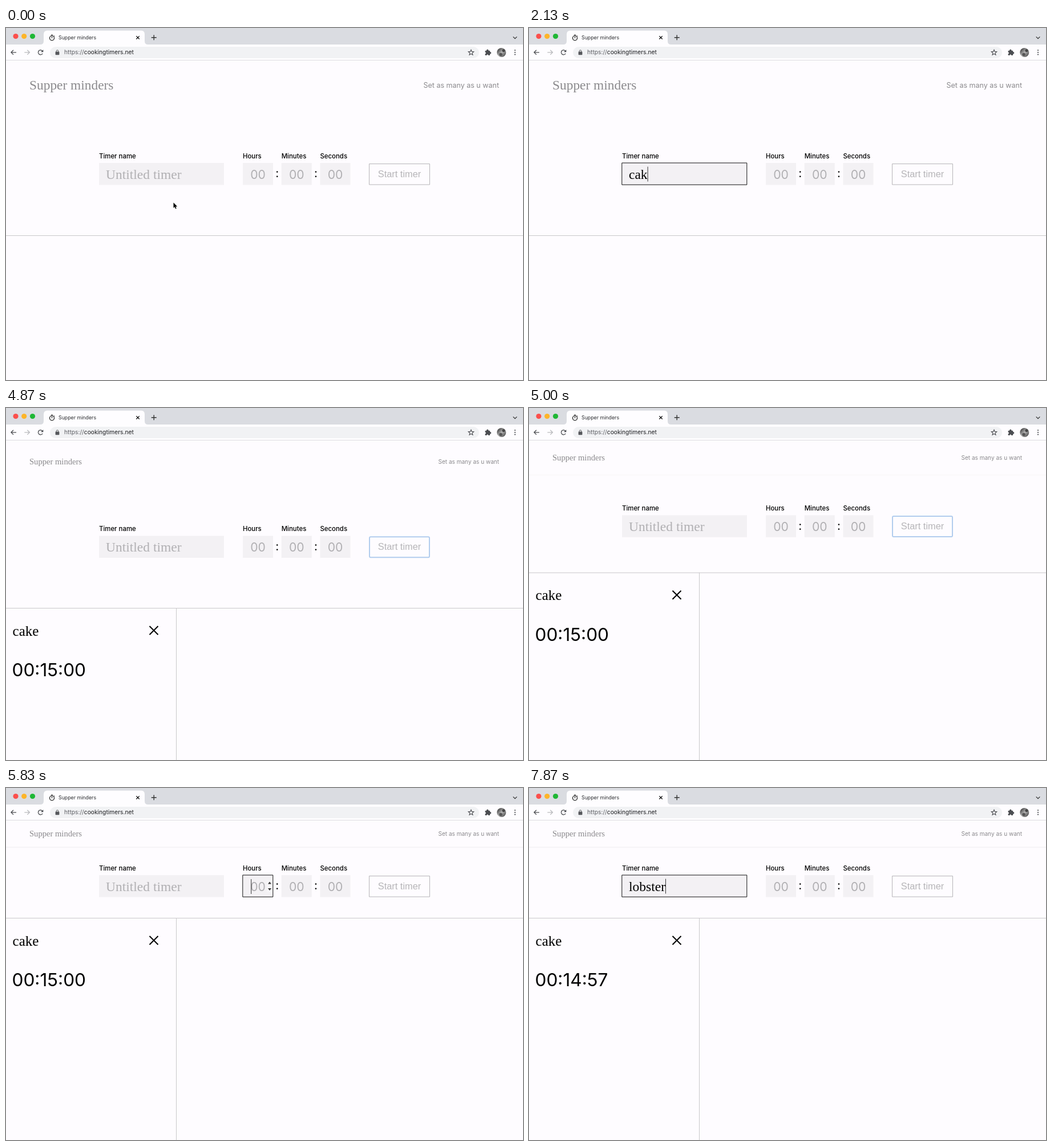
Write an HTML page with a canvas that moves like this. It is 906 by 618 pixels and loops after 8000 ms.

```html
<!DOCTYPE html>
<html lang="en">
<head>
<meta charset="utf-8">
<title>Supper minders</title>
<style>
html, body { margin: 0; width: 100%; height: 100%; overflow: hidden; background: #fefcff; }
canvas { display: block; width: 906px; height: 618px; }
</style>
</head>
<body>
<canvas id="stage" width="906" height="618"></canvas>
<script>
const ctx = document.getElementById('stage').getContext('2d');
const W = 906, H = 618, LOOP = 8000;
const SANS = 'Inter, sans-serif';
const SERIF = '"Liberation Serif", serif';
const ARIAL = '"Liberation Sans", sans-serif';
const NAME = 'Supper minders';
const PALE = '#b1b0b3', GREY = '#8b8a8d', INK = '#000', RULE = '#c9c8ca', FIELD = '#f3f1f4';
const SUBMIT = 4870, SHRINK = 260;

const clamp = v => Math.max(0, Math.min(1, v));
const lerp = (a, b, k) => a + (b - a) * k;
const ease = k => k * k * (3 - 2 * k);

function text(str, x, y, size, family, color, align = 'left', weight = 400) {
  ctx.font = `${weight} ${size}px ${family}`;
  ctx.textAlign = align;
  ctx.fillStyle = color;
  ctx.fillText(str, x, y);
}
function rect(x, y, w, h, color) {
  ctx.fillStyle = color;
  ctx.fillRect(x, y, w, h);
}
function frame(x, y, w, h, color, width = 1, r = 0) {
  ctx.beginPath();
  ctx.roundRect(x, y, w, h, r);
  ctx.strokeStyle = color;
  ctx.lineWidth = width;
  ctx.stroke();
}
function pill(x, y, w, h, r, color) {
  ctx.beginPath();
  ctx.roundRect(x, y, w, h, r);
  ctx.fillStyle = color;
  ctx.fill();
}
function disc(x, y, r, color) {
  ctx.beginPath();
  ctx.arc(x, y, r, 0, Math.PI * 2);
  ctx.fillStyle = color;
  ctx.fill();
}
function path(d, color, width) {
  const p = new Path2D(d);
  if (width) {
    ctx.strokeStyle = color;
    ctx.lineWidth = width;
    ctx.stroke(p);
  } else {
    ctx.fillStyle = color;
    ctx.fill(p);
  }
}
function cross(x, y, r, width) {
  path(`M${x - r} ${y - r}L${x + r} ${y + r}M${x + r} ${y - r}L${x - r} ${y + r}`, INK, width);
}

// Browser window
function drawTabs() {
  rect(0, 0, W, 29, '#dadce1');
  disc(17, 14.5, 4.6, '#fb4f4c');
  disc(31.7, 14.5, 4.6, '#fdb52a');
  disc(46.5, 14.5, 4.6, '#1fb735');
  path('M60 29Q66 29 66 23V11Q66 4.500 72.500 4.500H237Q243 4.500 243 11V23Q243 29 249 29Z', '#fefdff');
  ctx.beginPath();
  ctx.arc(80.5, 17.7, 4, 0, Math.PI * 2);
  ctx.strokeStyle = '#222';
  ctx.lineWidth = 1.3;
  ctx.stroke();
  path('M79 12H82M80.500 15.300V18M84 13.700L85 14.700', '#222', 1.2);
  text(NAME, 92, 20, 8.8, SANS, '#2c2d30');
  cross(231, 16.8, 2.7, 1.2);
  path('M254.700 16.800H263.700M259.200 12.300V21.300', '#333', 1.4);
  path('M888.700 15.400L892 18.600L895.300 15.400', '#333', 1.3);
}
function drawToolbar() {
  rect(0, 29, W, 27, '#fefdff');
  rect(0, 56, W, 1, '#dddce0');
  path('M18 42.800H9M13 38.700L8.900 42.800L13 46.900', '#4b4d51', 1.3);
  path('M32.300 42.800H41.300M37.300 38.700L41.400 42.800L37.300 46.900', '#b9babd', 1.3);
  ctx.beginPath();
  ctx.arc(60.5, 42.8, 4, 0.5, Math.PI * 1.75);
  ctx.strokeStyle = '#4b4d51';
  ctx.lineWidth = 1.4;
  ctx.stroke();
  path('M65.300 38V42.200H61.100Z', '#4b4d51');
  pill(77, 33, 752, 20, 10, '#f1f2f4');
  pill(86.6, 41.6, 6.8, 5.6, 0.8, '#55575b');
  path('M88.200 42V40.600A1.800 1.800 0 0 1 91.800 40.600V42', '#55575b', 1);
  text('https://', 102, 46.3, 10.25, SANS, '#5c5e63');
  const x = 102 + ctx.measureText('https://').width;
  text('cookingtimers.net', x, 46.3, 10.25, SANS, '#1c1d20');
  drawStar(815, 43.2);
  drawPuzzle();
  drawAvatar();
  for (const y of [39, 42.8, 46.6]) disc(892, y, 1.1, '#4b4d51');
}
function drawStar(x, y) {
  ctx.beginPath();
  for (let i = 0; i < 10; i++) {
    const a = i * Math.PI / 5 - Math.PI / 2, r = i % 2 ? 2.2 : 5;
    ctx.lineTo(x + r * Math.cos(a), y + r * Math.sin(a));
  }
  ctx.closePath();
  ctx.strokeStyle = '#4b4d51';
  ctx.lineWidth = 1.1;
  ctx.stroke();
}
function drawPuzzle() {
  pill(839.6, 39.8, 8.6, 8.2, 1, '#4b4d51');
  disc(843.8, 39.3, 1.7, '#4b4d51');
  disc(848.6, 43.8, 1.7, '#4b4d51');
  disc(839.6, 44, 1.4, '#fefdff');
  disc(843.8, 48, 1.4, '#fefdff');
}
function drawAvatar() {
  ctx.save();
  ctx.beginPath();
  ctx.arc(868.3, 43, 8, 0, Math.PI * 2);
  ctx.clip();
  const g = ctx.createLinearGradient(861, 36, 876, 50);
  g.addColorStop(0, '#2e2e2e');
  g.addColorStop(0.5, '#b4b4b4');
  g.addColorStop(1, '#3c3c3c');
  rect(860, 35, 17, 17, g);
  disc(867, 46.5, 2.8, '#555');
  disc(872, 39.5, 2.6, '#444');
  ctx.restore();
}

// Timed state: the last entry whose time has passed
function at(t, steps) {
  let value = steps[0][1];
  for (const [time, v] of steps) if (t >= time) value = v;
  return value;
}
const FOCUS = [[0, ''], [1130, 'name'], [2630, 'hours'], [3270, 'minutes'], [4300, 'seconds'],
  [4500, 'button'], [5330, 'seconds'], [5530, 'minutes'], [5730, 'hours'], [5930, 'name']];
const TYPED = [[0, ''], [1700, 'c'], [1930, 'ca'], [2130, 'cak'], [2230, 'cake'], [SUBMIT, ''],
  [6730, 'l'], [6930, 'lo'], [7000, 'lob'], [7270, 'lobs'], [7430, 'lobst'], [7570, 'lobste'], [7670, 'lobster']];
const MINUTES = [[0, ''], [3770, '1'], [4000, '15'], [SUBMIT, '']];
const KEYS = [...FOCUS, ...TYPED, ...MINUTES].map(s => s[0]).sort((a, b) => a - b);

function caretOn(t) {
  const last = KEYS.filter(k => k <= t).pop();
  return (t - last) % 1000 < 500;
}
function drawCaret(x, y) {
  rect(x, y, 1, 26, '#333');
}
function drawField(x, w, y, focused) {
  rect(x, y, w, 38.5, FIELD);
  if (focused) frame(x - 0.2, y - 0.1, w, 38.3, '#111');
}
function drawName(t, dy, focused) {
  const y = 237 + dy, value = at(t, TYPED), x = 175;
  text('Timer name', 163, 229 + dy, 11.4, SANS, INK, 'left', 500);
  drawField(163, 219, y, focused);
  text(value || 'Untitled timer', x, 265 + dy, 23.5, SERIF, value ? INK : PALE);
  if (focused && caretOn(t)) drawCaret(x + (value ? ctx.measureText(value).width : 0), y + 6.5);
}
function drawNumber(t, label, x, value, dy, focused) {
  const y = 237 + dy, tx = x + 13.2;
  text(label, x, 229 + dy, 11.4, SANS, INK, 'left', 500);
  drawField(x, 53, y, focused);
  text(value || '00', tx, 265 + dy, 21.2, SANS, value ? INK : PALE);
  if (!focused) return;
  if (caretOn(t)) drawCaret(tx + (value ? ctx.measureText(value).width : 1), y + 7);
  rect(x + 42, y + 9, 10, 21, '#f6f5f7');
  path(`M${x + 44} ${y + 15.5}h6l-3 -4Z M${x + 44} ${y + 23}h6l-3 4Z`, '#333');
}
function drawButton(t, dy, enabled) {
  const y = 238.5 + dy, ink = enabled ? INK : '#b6b5b8';
  const ring = clamp((t - 4500) / 200) * (1 - clamp((t - 5330) / 300));
  ctx.globalAlpha = 1 - ring;
  frame(636.5, y, 106, 36.5, ink);
  ctx.globalAlpha = ring;
  frame(637, y + 0.2, 105, 36, '#b2cdee', 2, 2);
  ctx.globalAlpha = 1;
  text('Start timer', 689.5, 262 + dy, 16.4, ARIAL, ink, 'center');
}
function drawForm(t, dy) {
  const focus = at(t, FOCUS), minutes = at(t, MINUTES);
  drawName(t, dy, focus === 'name');
  drawNumber(t, 'Hours', 415, '', dy, focus === 'hours');
  drawNumber(t, 'Minutes', 482.7, minutes, dy, focus === 'minutes');
  drawNumber(t, 'Seconds', 550.5, '', dy, focus === 'seconds');
  for (const x of [475.3, 543]) text(':', x, 262.3 + dy, 20.5, SANS, INK, 'center');
  drawButton(t, dy, minutes !== '');
}
function drawCard(t, top) {
  const left = 900 - Math.floor((t - SUBMIT) / 1000);
  const two = n => String(n).padStart(2, '0');
  rect(298, top, 1, H - top, RULE);
  text('cake', 11.5, top + 48.7, 25.1, SERIF, INK);
  cross(259, top + 39.5, 7.5, 2.1);
  text(`00:${two(Math.floor(left / 60))}:${two(left % 60)}`, 10.5, top + 120, 31.6, SANS, INK);
}

// Mouse
function drawArrow(x, y) {
  const d = `M${x} ${y}v9.500l2.100 -2l1.500 3.400l1.600 -0.700l-1.500 -3.300h3Z`;
  path(d, '#fff', 1.5);
  path(d, '#000');
}
function drawBeam(x, y) {
  const d = `M${x - 3} ${y - 6}q3 0 3 2v8q0 2 -3 2M${x + 3} ${y - 6}q-3 0 -3 2v8q0 2 3 2M${x - 1.8} ${y + 1.5}h3.600`;
  path(d, '#fff', 2.4);
  path(d, '#111', 1.1);
}
function drawMouse(t) {
  if (t >= 1700) return;
  const k = ease(clamp((t - 650) / 400));
  const x = lerp(293.5, 298.3, k), y = lerp(306.5, 262, k);
  if (y < 275.5) drawBeam(x, y);
  else drawArrow(x, y);
}

function draw(t) {
  rect(0, 0, W, H, '#fefcff');
  const running = t >= SUBMIT;
  const k = ease(clamp((t - SUBMIT) / SHRINK));
  const pick = (before, from, to) => running ? lerp(from, to, k) : before;
  const line = pick(364, 351, 228);

  text(NAME, 41, pick(108, 99, 85), running ? 14.6 : 23.4, SERIF, GREY);
  text('Set as many as u want', 864, pick(105, 98, 84), running ? 10.05 : 12.5, SANS, GREY, 'right');
  if (running) {
    ctx.globalAlpha = k;
    rect(0, lerp(131, 103.5, k), W, 1, '#efeef0');
    ctx.globalAlpha = 1;
  }
  drawForm(t, pick(0, -12.5, -84));
  rect(0, line, W, 1, RULE);
  if (running) drawCard(t, line);
  drawTabs();
  drawToolbar();
  drawMouse(t);
}

const start = performance.now();
function tick() {
  draw((performance.now() - start) % LOOP);
  requestAnimationFrame(tick);
}
tick();
</script>
</body>
</html>
```
